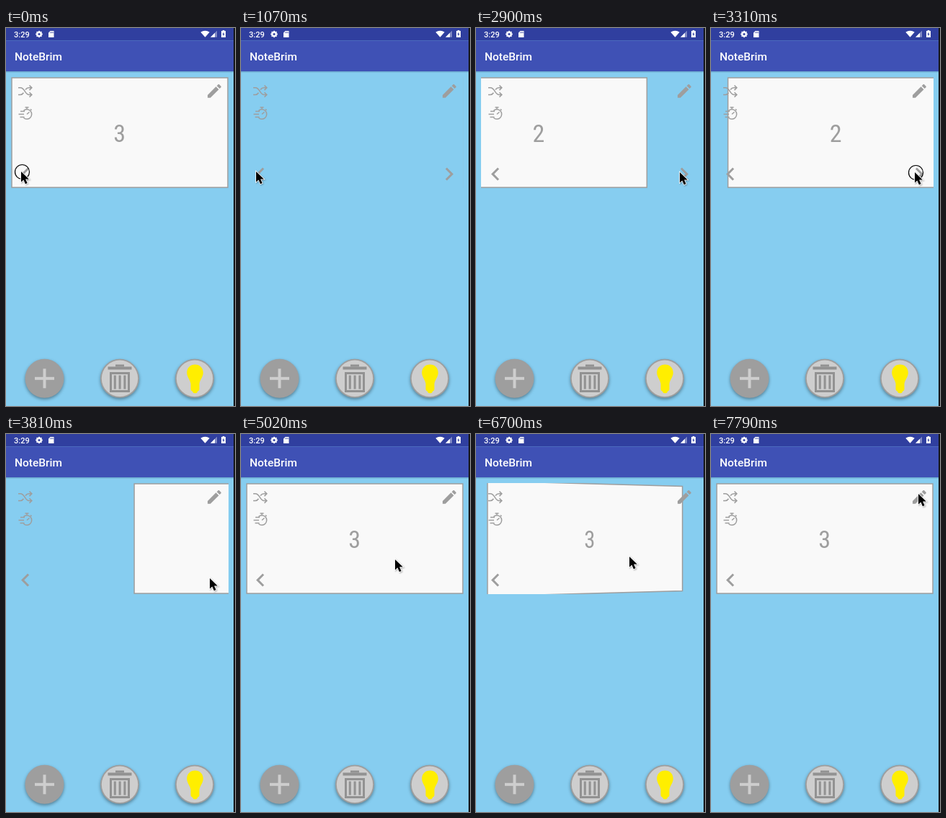
Recreate the animation shown at these times as an HTML page with a canvas. Size 318 px wide and 524 px high, loop 8 s.

```html
<!DOCTYPE html>
<html lang="en">
<head>
<meta charset="utf-8">
<title>Flash cards</title>
<style>
  html, body { margin: 0; width: 100%; height: 100%; overflow: hidden; background: #86cdf0; }
  canvas { display: block; width: 318px; height: 524px; }
</style>
</head>
<body>
<canvas id="stage"></canvas>
<script>
const W = 318, H = 524, LOOP = 8000;
const GREY = '#9e9e9e', PALE = '#cecece', PAPER = '#f9f9f9';
const FONT = 'Roboto, "Open Sans", sans-serif';
const canvas = document.getElementById('stage');
const ctx = canvas.getContext('2d');
const ratio = window.devicePixelRatio || 1;
canvas.width = W * ratio;
canvas.height = H * ratio;

// Card container and resting card
const VIEW = { x: 7, y: 68, w: 302, h: 154 };
const CARD = { cx: 158, cy: 145, hw: 150, hh: 76 };
const DEPTH = 1320;

// dir 1: leaves to the right, returns from the left
const slides = [
  { from: 792, to: 1362, dir: 1, card: 2 },
  { from: 1755, to: 2310, dir: 1, card: 1 },
  { from: 2815, to: 3350, dir: -1, card: 2 },
  { from: 3422, to: 3955, dir: -1, card: 3 }
];
const flips = [
  { from: 5290, to: 5718, dir: 1 },
  { from: 6350, to: 6778, dir: -1 }
];
const clicks = [[0, 20], [650, 800], [1600, 1750], [2660, 2810],
  [3280, 3430], [5140, 5290], [6200, 6350], [7650, 7790]];
const moves = [
  { from: 2310, to: 2550, x: 283, y: 200 },
  { from: 4560, to: 4810, x: 214, y: 174 },
  { from: 5010, to: 5110, x: 213, y: 170 },
  { from: 6860, to: 7120, x: 291, y: 85 },
  { from: 7370, to: 7500, x: 288, y: 83 }
];

const icons = {
  left: new Path2D('M15.41 7.41 14 6 8 12 14 18 15.41 16.59 10.83 12z'),
  right: new Path2D('M8.59 16.59 10 18 16 12 10 6 8.59 7.41 13.17 12z'),
  pencil: new Path2D('M3 17.25V21h3.75L17.81 9.94l-3.75-3.75zM20.71 7.04c.39-.39.39-1.02 0-1.41l-2.34-2.34c-.39-.39-1.02-.39-1.41 0l-1.83 1.83 3.75 3.75z'),
  shuffle: new Path2D('M17 82.8h3c6 0 6.500 9.700 12 9.700h3.500M17 92.500h3c2 0 3.300-1.200 4.400-2.800M27 85.500c1.200-1.600 2.700-2.700 5-2.700h3.500M32.500 79.500l3.300 3.300-3.300 3.300M32.500 89.200l3.300 3.300-3.300 3.300'),
  watch: new Path2D('M24.500 114.500a6.700 6.700 0 1 1 0 10M26.500 110h5M29 110v2.500M34 112.500l1.500 1.500M29 119.500l3.500-3M20 115.500h6M17.500 119.500h7.500M19.500 123.500h6'),
  bulb: new Path2D('M262.500 466.500c6.600 0 11.300 4.800 11.300 11.200 0 6-4.300 9.300-5.300 15.300v7.500c0 1.500-1 2.500-2.200 3l-1.300 2.200q-2.500 1.300-5 0l-1.300-2.200c-1.200-.5-2.200-1.500-2.200-3V493c-1-6-5.300-9.300-5.300-15.300 0-6.400 4.700-11.200 11.300-11.200z'),
  arrow: new Path2D('M0 0V14.500L3.400 11.400 5.900 17.200 8.600 16 6.100 10.400H10.800z')
};

const ease = p => 0.5 - 0.5 * Math.cos(Math.PI * Math.min(1, Math.max(0, p)));
const active = (list, t) => list.find(a => t >= a.from && t < a.to);

function rect(x, y, w, h, color) {
  ctx.fillStyle = color;
  ctx.fillRect(x, y, w, h);
}

function poly(points, color) {
  ctx.beginPath();
  points.forEach(([x, y]) => ctx.lineTo(x, y));
  ctx.closePath();
  if (color) {
    ctx.fillStyle = color;
    ctx.fill();
  }
}

function disc(x, y, r, color) {
  ctx.beginPath();
  ctx.arc(x, y, r, 0, Math.PI * 2);
  ctx.fillStyle = color;
  ctx.fill();
}

function label(text, x, y, font, color, align = 'left') {
  ctx.font = font;
  ctx.fillStyle = color;
  ctx.textAlign = align;
  ctx.fillText(text, x, y);
}

function fillIcon(path, x, y, scale) {
  ctx.save();
  ctx.translate(x, y);
  ctx.scale(scale, scale);
  ctx.fillStyle = GREY;
  ctx.fill(path);
  ctx.restore();
}

function strokeIcon(path, width) {
  ctx.strokeStyle = GREY;
  ctx.lineWidth = width;
  ctx.stroke(path);
}

function drawBars() {
  rect(0, 0, W, H, '#86cdf0');
  rect(0, 60, W, 1.5, 'rgba(20,50,90,.22)');
  rect(0, 0, W, 17.5, '#303f9f');
  rect(0, 17.5, W, 42.5, '#3f51b5');
  label('3:29', 11, 12.5, '500 11px ' + FONT, '#fff');
  label('NoteBrim', 12, 45, '500 15.5px ' + FONT, '#fff');

  // Gear
  for (let i = 0; i < 8; i++) {
    const a = i * Math.PI / 4;
    disc(46 + Math.cos(a) * 3.6, 8.5 + Math.sin(a) * 3.6, 1.2, '#fff');
  }
  disc(46, 8.5, 3.6, '#fff');
  disc(46, 8.5, 1.5, '#303f9f');

  // Memory card
  poly([[61.5, 4], [66.5, 4], [66.5, 13], [59, 13], [59, 6.500]], '#fff');
  for (let i = 0; i < 3; i++) rect(61.3 + i * 1.7, 5.2, 0.8, 2, '#303f9f');

  // Wireless, signal, battery
  ctx.beginPath();
  ctx.moveTo(276.5, 12.8);
  ctx.lineTo(270.3, 5.8);
  ctx.quadraticCurveTo(276.5, 1.8, 282.7, 5.8);
  ctx.fillStyle = '#fff';
  ctx.fill();
  poly([[284, 12.8], [293, 12.8], [293, 3.8]], 'rgba(255,255,255,.4)');
  poly([[284, 12.8], [290, 12.8], [290, 6.8]], '#fff');
  rect(299, 4, 6, 9, '#fff');
  rect(300.7, 3, 2.6, 1, '#fff');
  poly([[302.6, 5.5], [300.4, 9], [301.7, 9], [301.4, 11.5], [303.6, 8], [302.3, 8]], '#303f9f');
}

function drawButton(x, fill) {
  ctx.save();
  ctx.shadowColor = 'rgba(0,0,0,.38)';
  ctx.shadowBlur = 4 * ratio;
  ctx.shadowOffsetY = 2 * ratio;
  disc(x, 485.8, 27, GREY);
  ctx.restore();
  disc(x, 485.8, 25.2, fill);
}

function drawButtons() {
  drawButton(53.5, GREY);
  rect(40, 483.8, 27, 4, PALE);
  rect(51.5, 472.3, 4, 27, PALE);

  drawButton(158, PALE);
  const ink = '#929292';
  rect(152, 466.5, 12, 3, ink);
  rect(141.5, 469.5, 33, 4, ink);
  rect(144, 477, 28, 28, ink);
  rect(147, 480, 22, 22, PALE);
  for (let i = 0; i < 3; i++) rect(149.8 + i * 6.8, 481.5, 3, 19, ink);

  drawButton(262, PALE);
  ctx.fillStyle = '#ffee00';
  ctx.fill(icons.bulb);
}

function project(x, y, angle) {
  const k = DEPTH / (DEPTH - x * Math.sin(angle));
  return [CARD.cx + x * Math.cos(angle) * k, CARD.cy + y * k];
}

// First half goes away, second half comes back from the other side
function pose(t) {
  const slide = active(slides, t), flip = active(flips, t);
  const act = slide || flip;
  if (!act) return { shift: 0, angle: 0 };
  const p = (t - act.from) / (act.to - act.from) * 2;
  const k = act.dir * (p < 1 ? ease(p) : ease(p - 1) - 1);
  return slide ? { shift: k * VIEW.w, angle: 0 } : { shift: 0, angle: -k * Math.PI / 2 };
}

function drawCard(t, value) {
  const { shift, angle } = pose(t);
  const { hw, hh } = CARD;
  ctx.save();
  ctx.beginPath();
  ctx.rect(VIEW.x, VIEW.y, VIEW.w, VIEW.h);
  ctx.clip();
  ctx.translate(shift, 0);
  poly([[-hw, -hh], [hw, -hh], [hw, hh], [-hw, hh]].map(([x, y]) => project(x, y, angle)), PAPER);
  ctx.strokeStyle = GREY;
  ctx.lineWidth = 1.5;
  ctx.stroke();
  ctx.translate(CARD.cx, CARD.cy);
  ctx.scale(Math.cos(angle), 1);
  label(String(value), -0.3, 13, 'condensed 34px "Roboto Condensed", ' + FONT, GREY, 'center');
  ctx.restore();
}

function drawIcons(value) {
  strokeIcon(icons.shuffle, 1.6);
  strokeIcon(icons.watch, 1.5);
  fillIcon(icons.pencil, 276.8, 74.8, 1.05);
  if (value > 1) fillIcon(icons.left, 9, 184.5, 1.5);
  if (value < 3) fillIcon(icons.right, 271, 184.5, 1.5);
}

function pointer(t) {
  let x = 21, y = 199;
  for (const m of moves) {
    const k = ease((t - m.from) / (m.to - m.from));
    x += (m.x - x) * k;
    y += (m.y - y) * k;
  }
  return [x, y];
}

function drawPointer(t) {
  const [x, y] = pointer(t);
  if (clicks.some(([on, off]) => t >= on && t < off)) {
    ctx.beginPath();
    ctx.arc(x + 1.5, y + 0.5, 10, 0, Math.PI * 2);
    ctx.strokeStyle = '#000';
    ctx.lineWidth = 1.2;
    ctx.stroke();
  }
  ctx.save();
  ctx.translate(x, y);
  ctx.shadowColor = 'rgba(0,0,0,.3)';
  ctx.shadowBlur = 2 * ratio;
  ctx.shadowOffsetX = ctx.shadowOffsetY = ratio;
  ctx.strokeStyle = '#fff';
  ctx.lineWidth = 1.6;
  ctx.stroke(icons.arrow);
  ctx.shadowColor = 'transparent';
  ctx.fillStyle = '#000';
  ctx.fill(icons.arrow);
  ctx.restore();
}

function draw(t) {
  ctx.setTransform(ratio, 0, 0, ratio, 0, 0);
  const value = slides.reduce((v, s) => t >= s.from ? s.card : v, 3);
  drawBars();
  drawButtons();
  drawCard(t, value);
  drawIcons(value);
  rect(316, 0, 2, H, '#15171c');
  drawPointer(t);
}

const start = performance.now();
function tick() {
  draw((performance.now() - start) % LOOP);
  requestAnimationFrame(tick);
}
tick();
</script>
</body>
</html>
```
